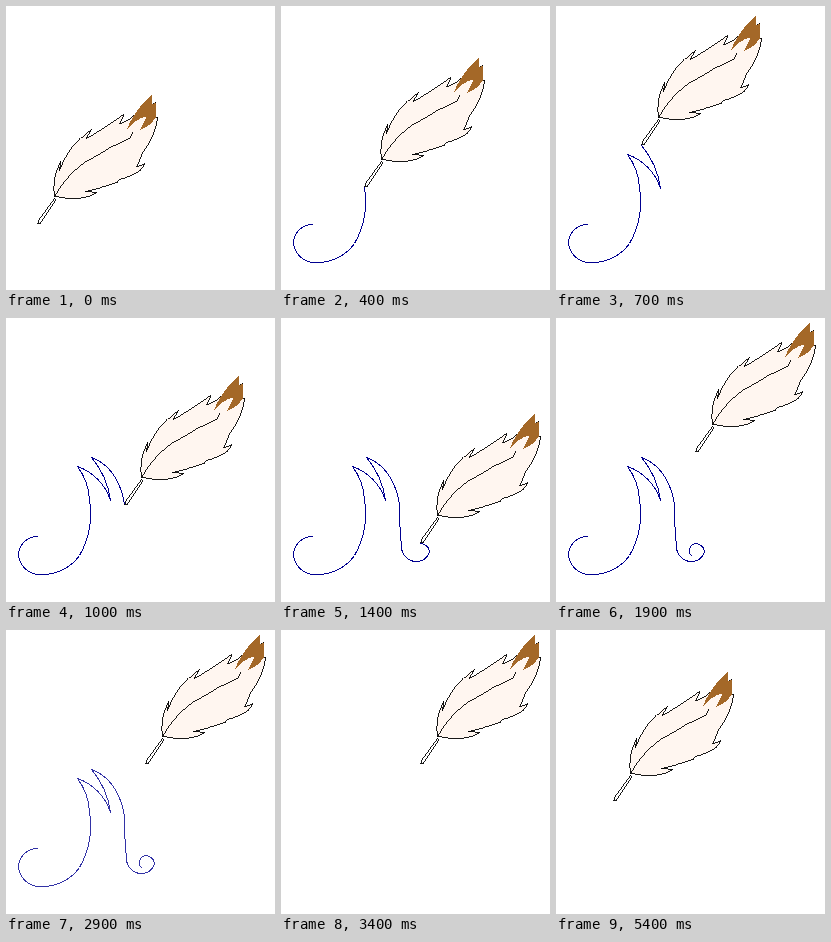
An HTML page that plays this animation: 269x284 px, repeating every 5.5 s.

```html
<!DOCTYPE html>
<html lang="en">
<head>
<meta charset="utf-8">
<title>Quill</title>
<style>
  html, body { margin: 0; height: 100%; overflow: hidden; background: #fff; }
  svg { display: block; width: 100vw; height: 100vh; }
  path { fill: none; stroke: #000; stroke-width: .9; shape-rendering: crispEdges; }
  #ink { stroke: #000090; stroke-width: 1; }
  #vane { fill: #fff6f0; }
  #burn { fill: #a46828; stroke: none; }
  #shaft { fill: #fff; }
</style>
</head>
<body>
<svg viewBox="0 0 269 284">
  <g transform="translate(.5 .5)">
    <path id="ink"/>
    <!-- the nib is at 0,0 -->
    <g id="quill">
      <path id="vane" d="M17-28Q14-44 23-64L22-54Q30-78 54-96L48-86Q64-94 86-110L82-101Q104-109 114-130V-120L118-123V-107L120-108Q119-90 104-70L99-58L107-61L102-54Q97-49 81-45L79-42Q62-36 47-33L59-32Q42-22 17-28Z"/>
      <path id="burn" d="M114-130Q95-112 89-94Q98-106 109-108L103-95Q113-98 118-107V-122L114-120Z"/>
      <path id="rib" d="M17-28Q30-51 50-64T92-86L95-93"/>
      <path id="shaft" d="M0-1L1-5L17-27L18-25L2-1Z"/>
    </g>
  </g>
</svg>
<script>
  const STEP = 100, LOOP = 5500, FADE = 29, GONE = 34, RETURN = 54;
  const START = [31, 218], REST = [139, 134], BACK = [57, 171];

  // pen strokes, one per step: end point and arc radius (positive is clockwise)
  const strokes = [
    [12, 237, -19], [37, 256, -22], [73, 237, -45], [83, 181, -85],
    [71, 148, -60], [104, 182, 53], [85, 139, -83],
    [101, 149, 47], [115, 173, 60], [118, 187, 60], [120, 229, -400],
    [134, 243, -15], [148, 233, -13], [139, 225, -9], [133, 232, -7], [136, 237, -4]
  ];
  const LIFT = strokes.length, LIFT_STEPS = 3;

  const ink = document.getElementById('ink');
  const quill = document.getElementById('quill');

  const arc = ([x, y, r]) => `A${Math.abs(r)} ${Math.abs(r)} 0 0 ${+(r > 0)} ${x} ${y}`;

  function nib(n) {
    if (n === 0) return START;
    if (n <= LIFT) return strokes[n - 1].slice(0, 2);
    if (n >= RETURN) return BACK;
    // rise from the page, swinging a little to the right
    const t = Math.min((n - LIFT) / LIFT_STEPS, 1);
    const [x, y] = strokes[LIFT - 1];
    const swing = 9 * Math.sin(Math.PI * t);
    const rise = Math.sin(t * Math.PI / 2) ** 1.4;
    return [x + (REST[0] - x) * t + swing, y + (REST[1] - y) * rise].map(Math.round);
  }

  function draw(now) {
    const n = Math.floor(now % LOOP / STEP);
    const written = n < GONE ? strokes.slice(0, n) : [];
    const fade = Math.max(0, Math.min(n - FADE + 1, 4));

    quill.setAttribute('transform', `translate(${nib(n)})`);
    ink.setAttribute('d', `M${START}` + written.map(arc).join(''));
    ink.style.opacity = 1 - fade * 0.2;
    ink.style.filter = fade ? `blur(${fade * 0.4}px)` : 'none';
  }

  const begin = performance.now();
  function tick() {
    draw(performance.now() - begin);
    requestAnimationFrame(tick);
  }
  tick();
</script>
</body>
</html>
```
